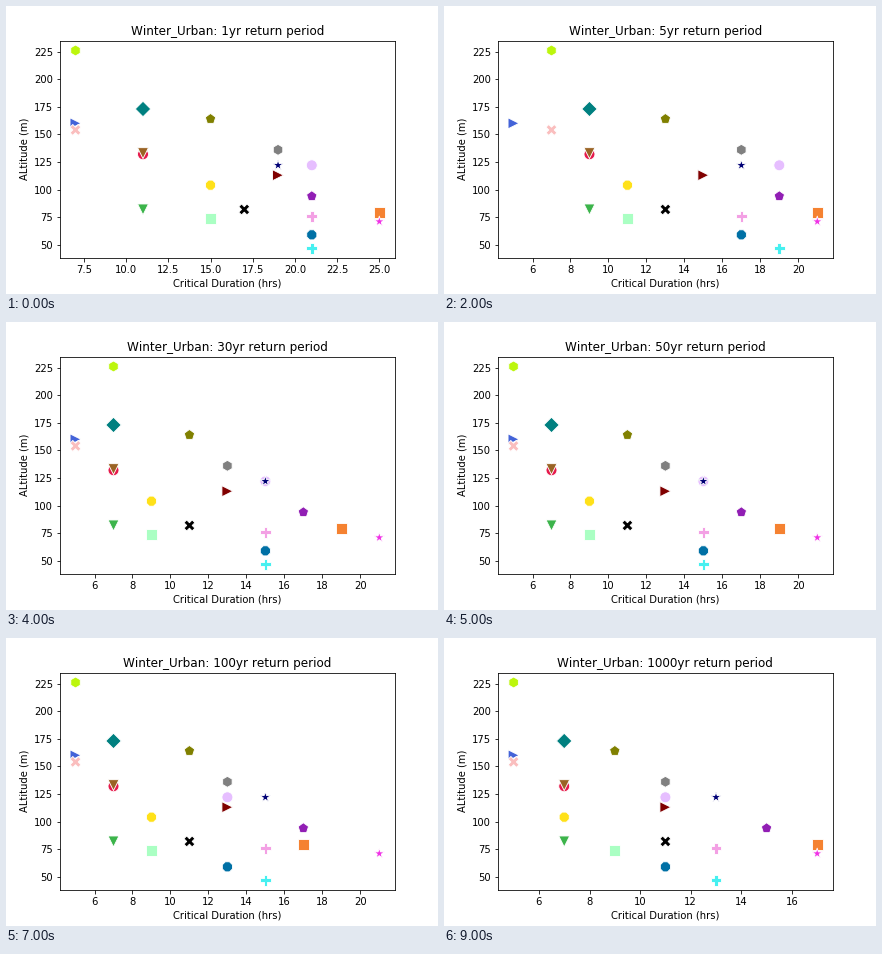
Animation, 432 px wide and 288 px high, one loop 10 s. Source, as a matplotlib script:

```python
import matplotlib.pyplot as plt
from matplotlib.animation import FuncAnimation
from matplotlib.markers import MarkerStyle

PERIODS = [1, 2, 5, 10, 30, 50, 75, 100, 200, 1000]
MARKERS = "ov8>spP*hXD"
SIZE = 120

# colour, altitude, duration at the first period,
# period indices at which the duration drops by two hours
STATIONS = [
    ("#e6194b", 132, 11, (1, 3)),
    ("#3cb44b", 82, 11, (1, 3)),
    ("#ffe119", 104, 15, (1, 2, 3, 9)),
    ("#4363d8", 160, 7, (2,)),
    ("#f58231", 79, 25, (1, 2, 3, 6)),
    ("#911eb4", 94, 21, (1, 4, 9)),
    ("#46f0f0", 47, 21, (2, 3, 4, 9)),
    ("#f032e6", 71, 25, (1, 2, 8, 9)),
    ("#bcf60c", 226, 7, (5,)),
    ("#fabebe", 154, 7, (4,)),
    ("#008080", 173, 11, (1, 3)),
    ("#e6beff", 122, 21, (1, 3, 4, 7, 9)),
    ("#9a6324", 133, 11, (1, 3)),
    ("#0070a5", 59, 21, (1, 2, 3, 7, 9)),
    ("#800000", 113, 19, (1, 2, 4, 9)),
    ("#aaffc3", 74, 15, (1, 2, 3)),
    ("#808000", 164, 15, (1, 3, 9)),
    ("#f3a0e4", 76, 21, (1, 2, 4, 8)),
    ("#000075", 122, 19, (1, 3, 8)),
    ("#808080", 136, 19, (1, 3, 4, 8)),
    ("#000000", 82, 17, (1, 2, 4)),
]
COLOURS = [s[0] for s in STATIONS]
ALTITUDES = [s[1] for s in STATIONS]

plt.rcParams["font.family"] = "DejaVu Sans"
plt.rcParams["text.kerning_factor"] = 6
fig = plt.figure(figsize=(6, 4), dpi=72, facecolor="white")
fig.subplots_adjust(left=0.125, right=0.9, bottom=0.125, top=0.88)
ax = fig.add_subplot()


def marker_path(name):
    style = MarkerStyle(name)
    return style.get_path().transformed(style.get_transform())


PATHS = [marker_path(MARKERS[i % len(MARKERS)]) for i in range(len(STATIONS))]


def limits(values, pixels, margin=0.05):
    """Data range widened by a marker radius and a relative margin."""
    radius = SIZE ** 0.5 / 2 / pixels
    low, high = min(values) - radius, max(values) + radius
    pad = margin * (high - low)
    return low - pad, high + pad


def duration(start, drops, step):
    return start - 2 * sum(step >= d for d in drops)


def draw(step):
    ax.clear()
    hours = [duration(start, drops, step) for _, _, start, drops in STATIONS]
    points = ax.scatter(hours, ALTITUDES, s=SIZE, c=COLOURS,
                        edgecolors="white", linewidths=0.08 * SIZE ** 0.5)
    points.set_paths(PATHS)
    ax.set_xlim(limits(hours, ax.bbox.width))
    ax.set_ylim(limits(ALTITUDES, ax.bbox.height))
    ax.set_xlabel("Critical Duration (hrs)")
    ax.set_ylabel("ALtitude (m)")
    ax.set_title(f"Winter_Urban: {PERIODS[step]}yr return period")
    return []


anim = FuncAnimation(fig, draw, frames=len(PERIODS), interval=1000,
                     init_func=lambda: draw(0), repeat=True, repeat_delay=0)
plt.show()
```
